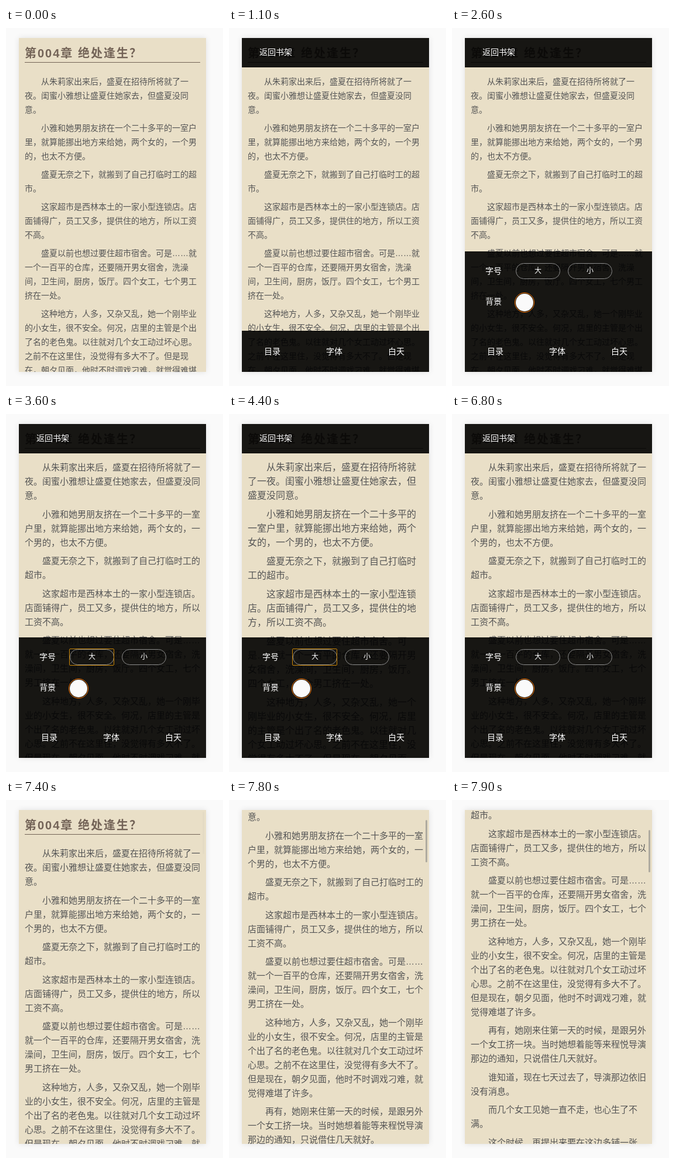
Write an HTML page that moves like this. It is 371 by 609 pixels and loops after 8000 ms.

```html
<!DOCTYPE html>
<html lang="zh-CN">
<head>
<meta charset="utf-8">
<title>Reader</title>
<style>
html, body { margin: 0; width: 100%; height: 100%; overflow: hidden; background: #fafafa; }
body { position: relative; font-family: "Liberation Sans", "Noto Sans CJK SC", "Noto Sans CJK", sans-serif; }
.page, .page div, .page span { position: absolute; box-sizing: border-box; }
.page { left: 22px; top: 17px; width: 320px; height: 568px; background: #e9dfc7; box-shadow: 0 0 10px rgba(0,0,0,.1); }
.page .clip { inset: 0; overflow: hidden; }
.page .book { left: 10px; top: 0; width: 300px; color: #555; }
h1 { position: absolute; left: 0; top: 12px; width: 300px; height: 29px; margin: 0; font-size: 20px; line-height: 28px;
  letter-spacing: 2px; color: #736357; border-bottom: 1px solid #736357; white-space: nowrap; }
.page .text { top: 62px; width: 300px; line-height: 24px; text-spacing-trim: space-all; }
p { margin: 0 0 .5em; text-indent: 2em; }
.page .bar { left: 0; width: 320px; background: rgba(0,0,0,.9); color: #fff; }
.bar span { font-size: 14px; font-weight: 500; line-height: 24px; white-space: nowrap; }
.page .btn { top: 20px; width: 76px; height: 27px; border: 1px solid #8c8c8c; border-radius: 14px;
  font-size: 12px; line-height: 25px; text-align: center; }
.page .ring { left: 86px; top: 19px; width: 77px; height: 29px; border: 1px solid #c88405; border-radius: 2px; }
.page .dot { left: 85px; top: 70px; width: 34px; height: 34px; border: 1.5px solid #ff7800; border-radius: 50%; }
.page .dot div { inset: 1px; background: #fafafa; border-radius: 50%; }
.page .thumb { left: 314px; width: 3px; border-radius: 1.5px; background: #808080; }
</style>
</head>
<body>
<div class="page">
  <div class="clip">
    <div class="book" id="book">
      <h1>第004章 绝处逢生？</h1>
      <div class="text" id="text">
        <p>从朱莉家出来后，盛夏在招待所将就了一夜。闺蜜小雅想让盛夏住她家去，但盛夏没同意。</p>
        <p>小雅和她男朋友挤在一个二十多平的一室户里，就算能挪出地方来给她，两个女的，一个男的，也太不方便。</p>
        <p>盛夏无奈之下，就搬到了自己打临时工的超市。</p>
        <p>这家超市是西林本土的一家小型连锁店。店面铺得广，员工又多，提供住的地方，所以工资不高。</p>
        <p>盛夏以前也想过要住超市宿舍。可是……就一个一百平的仓库，还要隔开男女宿舍，洗澡间，卫生间，厨房，饭厅。四个女工，七个男工挤在一处。</p>
        <p>这种地方，人多，又杂又乱，她一个刚毕业的小女生，很不安全。何况，店里的主管是个出了名的老色鬼。以往就对几个女工动过坏心思。之前不在这里住，没觉得有多大不了。但是现在，朝夕见面，他时不时调戏刁难，就觉得难堪了许多。</p>
        <p>再有，她刚来住第一天的时候，是跟另外一个女工挤一块。当时她想着能等来程悦导演那边的通知，只说借住几天就好。</p>
        <p>谁知道，现在七天过去了，导演那边依旧没有消息。</p>
        <p>而几个女工见她一直不走，也心生了不满。</p>
        <p>这个时候，再提出来要在这边多铺一张床，更难开口。</p>
      </div>
    </div>
    <div class="bar" id="top" style="top:0;height:50px">
      <span style="left:30px;top:12px">返回书架</span>
    </div>
    <div class="bar" id="panel" style="top:363px;height:135px">
      <span style="left:35px;top:21px">字号</span>
      <div class="btn" style="left:87px">大</div>
      <div class="btn" style="left:176px">小</div>
      <div class="ring" id="ring"></div>
      <span style="left:35px;top:73px">背景</span>
      <div class="dot"><div></div></div>
    </div>
    <div class="bar" id="foot" style="top:498px;height:70px">
      <span style="left:38px;top:23px">目录</span>
      <span style="left:144px;top:23px">字体</span>
      <span style="left:250px;top:23px">白天</span>
    </div>
    <div class="thumb" id="thumb"></div>
  </div>
</div>
<script>
const LOOP = 8000;
const el = id => document.getElementById(id);

// Each step changes only the listed values.
const start = { size: 14, menu: false, panel: false, ring: false, thumb: 0, scroll: 0 };
const steps = [
  [1100, { menu: true }],
  [2600, { panel: true }],
  [3600, { size: 15, ring: true }],
  [4000, { thumb: .4 }],
  [4100, { thumb: .2 }],
  [4200, { thumb: 0 }],
  [4400, { size: 16 }],
  [4800, { thumb: .4 }],
  [4900, { thumb: .2 }],
  [5000, { thumb: 0 }],
  [5600, { ring: false }],
  [6800, { size: 15 }],
  [7200, { thumb: .4 }],
  [7300, { thumb: .2, menu: false, panel: false }],
  [7400, { thumb: .04 }],
  [7800, { thumb: .55, scroll: 110 }],
  [7900, { thumb: .55, scroll: 248 }]
];

const show = (id, on) => { el(id).style.display = on ? "block" : "none"; };

function draw(t) {
  const s = Object.assign({}, start, ...steps.filter(k => k[0] <= t).map(k => k[1]));
  el("text").style.fontSize = s.size + "px";
  el("book").style.transform = `translateY(${-s.scroll}px)`;
  show("top", s.menu);
  show("foot", s.menu);
  show("panel", s.panel);
  show("ring", s.ring);
  const bar = el("thumb").style;
  bar.opacity = s.thumb;
  bar.top = 3 + Math.round(s.scroll / 8) + "px";
  bar.height = (s.size === 16 ? 66 : 72) + "px";
}

const t0 = performance.now();
function tick() {
  draw((performance.now() - t0) % LOOP);
  requestAnimationFrame(tick);
}
tick();
</script>
</body>
</html>
```
